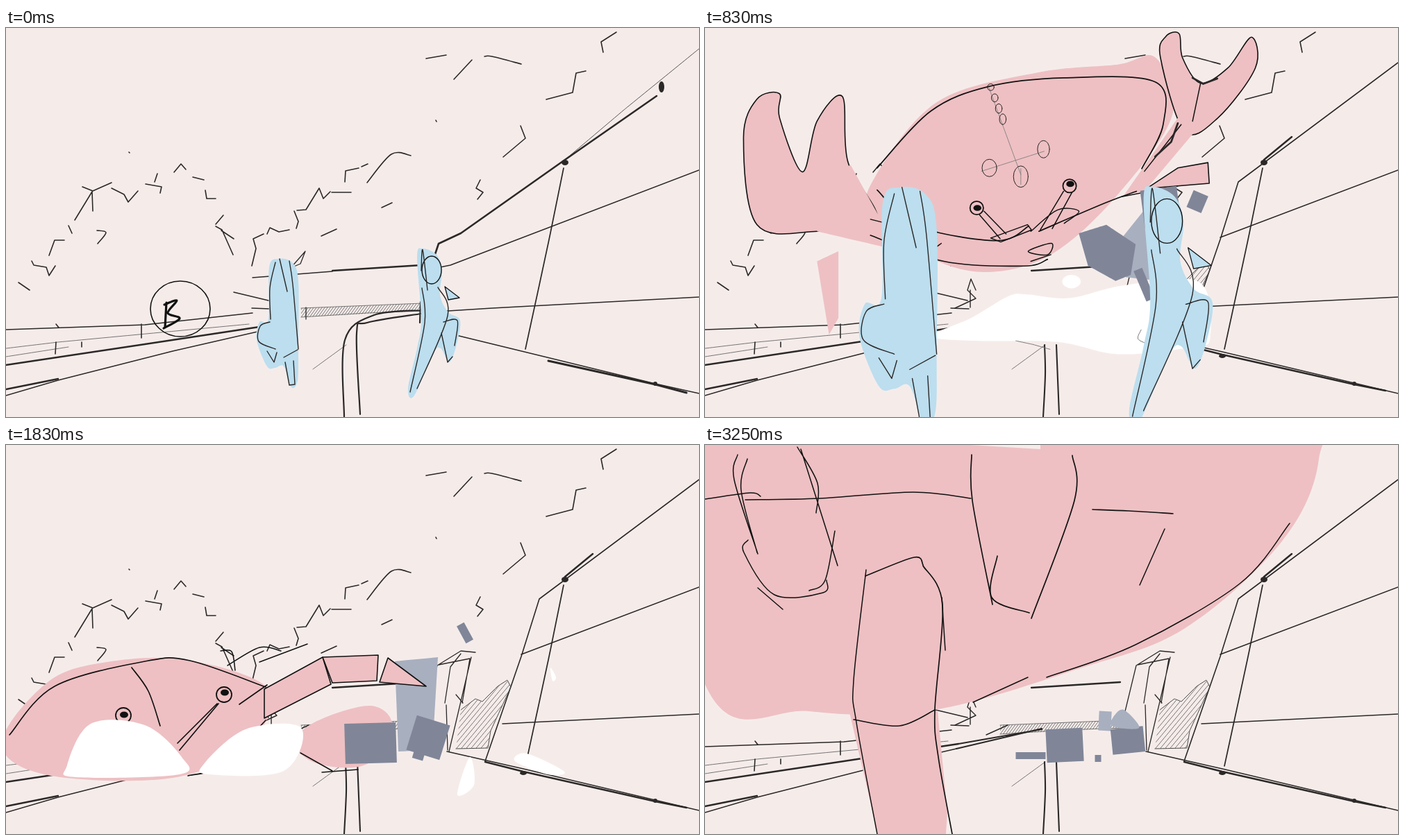
An HTML page with a canvas for the animation above (3370 ms loop, 998 by 561 pixels).

```html
<!DOCTYPE html>
<html lang="en">
<head>
<meta charset="utf-8">
<title>Giant crab storyboard</title>
<style>
html, body { margin: 0; height: 100%; overflow: hidden; background: #f5ecea }
canvas { display: block }
</style>
</head>
<body>
<canvas id="stage" width="998" height="561"></canvas>
<script>
const c = document.getElementById('stage').getContext('2d');
const PAPER = '#f5ecea', PINK = '#eec0c3', BLUE = '#bcdeee', SLATE = '#808698';
const MIST = '#a8afbf', WHITE = '#fff', COAL = '#2b2828', BLACK = '#111';
let T = -1, zoom = 1;
c.lineCap = c.lineJoin = 'round';

// Strokes split by ";". Prefix "~": smooth, "o": smooth and closed, "z": straight and closed.
function trace(text) {
  c.beginPath();
  for (const part of text.split(';')) {
    const n = part.match(/[\d.-]+/g).map(Number), len = n.length / 2;
    const closed = 'oz'.includes(part[0]), k = '~o'.includes(part[0]) ? 1 / 6 : 0;
    const at = i => {
      const j = closed ? (i + len) % len : Math.max(0, Math.min(len - 1, i));
      return [n[2 * j], n[2 * j + 1]];
    };
    c.moveTo(...at(0));
    for (let i = 0; i < len - !closed; i++) {
      const [a, p, q, d] = [at(i - 1), at(i), at(i + 1), at(i + 2)];
      c.bezierCurveTo(p[0] + (q[0] - a[0]) * k, p[1] + (q[1] - a[1]) * k,
        q[0] - (d[0] - p[0]) * k, q[1] - (d[1] - p[1]) * k, ...q);
    }
  }
}
function pen(w, color) {
  c.lineWidth = w / zoom;
  c.strokeStyle = color;
  c.stroke();
}
function ink(text, w = 1.5, color = BLACK) {
  trace(text);
  pen(w, color);
}
function fill(color, text) {
  trace(text);
  c.fillStyle = color;
  c.fill();
}
function shape(color, text, w = 1.6) {
  fill(color, text);
  pen(w, BLACK);
}
function oval(x, y, rx, ry, w, color) {
  c.beginPath();
  c.ellipse(x, y, rx, ry, 0, 0, 7);
  if (color) { c.fillStyle = color; c.fill(); }
  if (w) pen(w, BLACK);
}
function eye(x, y, r, lift = 0) {
  oval(x, y, r, r, 1.8, PINK);
  oval(x + 1, y - lift, 6, 4.5, 0, BLACK);
}
function block(color, x, y, w, h, turn = 0) {
  c.save();
  c.translate(x, y);
  c.rotate(turn);
  c.fillStyle = color;
  c.fillRect(-w / 2, -h / 2, w, h);
  c.restore();
}
function hatch(text, x0, x1, y0, y1, gap, lean) {
  c.save();
  trace(text);
  c.clip();
  for (let x = x0; x < x1; x += gap) ink(`${x} ${y1} ${x + lean} ${y0}`, 0.9, '#666');
  c.restore();
}

function trees() {
  const leaf = text => ink(text, 1.6, COAL);
  leaf('605 44 634 39;645 74 671 46;~689 41 700 41 742 52;778 103 816 93 821 65 835 62;879 6 857 20 860 35;716 186 748 159 741 141;683 219 677 231 687 237 679 247');
  leaf('541 259 556 252;454 300 476 290;~520 223 555 182 583 184;488 222 489 206 508 202;469 237 497 237;419 263 432 262 451 231 457 246 467 236;415 264 421 279 418 289');
  leaf('376 297 380 288 393 294 408 291;354 343 360 318 356 304 371 297;302 283 313 270;302 286 311 291 327 327;310 292 328 304;287 234 289 246 302 246;269 215 285 219');
  leaf('242 208 252 196 259 204;201 225 224 229 222 238;214 222 218 210;152 231 170 240 176 251 190 235;110 229 125 235 152 223;99 277 124 236 125 264;90 285 95 296');
  leaf('37 336 40 342 58 345 62 357 71 343;~131 292 144 295 132 311;18 367 34 378;62 328 70 306 84 306;512 200 521 196;177 179 178 180;619 133 620 135');
}

function road(broken) {
  ink('0 462 75 453 350 427;0 474 90 460;490 457 442 492', 0.9, '#666');
  ink('0 435 200 428 355 411;0 530 75 508 240 466 362 438;72 427 76 432;72 453 71 470;109 453 109 460;195 427 195 447;328 381 378 393;354 404 380 405', 1.6, COAL);
  ink('0 486 200 456 365 431;0 521 75 506;470 350 598 342', 2.3, COAL);
  ink('425 404 600 397;425 417 520 411 600 408', 0.9, '#666');
  hatch('425 404 600 397 600 408 425 417', 415, 605, 395, 420, 4, 18);
  if (broken) {
    ink('365 431 485 410;362 438 485 409;~489 457 490 500 487 561;506 457 510 557', 2.1, COAL);
    ink('383 362 378 378 390 390 360 404;383 362 390 378;382 378 382 403;405 418 436 404', 1.4, COAL);
  } else {
    ink('~487 561 488 450 530 414 598 407;~510 557 505 440 520 425 598 412;597 395 596 425', 2.2, COAL);
    ink('z410 346 431 322 424 340;355 360 470 351;432 403 432 420', 1.3, COAL);
  }
}

function wall(broken) {
  oval(805, 194, 5, 4, 0, COAL);
  oval(935, 513, 3, 3, 0, COAL);
  ink('~803 202 781 310 748 463', 1.7, COAL);
  if (!broken) {
    oval(944, 85, 4, 8, 0, COAL);
    ink('998 30 890 118 805 190', 1, '#555');
    ink('937 98 805 190 655 296 623 311 618 326', 2.6, COAL);
    ink('625 345 640 342 998 205;605 410 700 404 998 388;640 441 935 513 998 527', 1.6, COAL);
    ink('781 480 935 514 980 526', 3, COAL);
    return;
  }
  ink('998 50 768 222 742 305 690 456;742 302 998 205;715 402 998 388;635 442 745 467 998 527', 1.6, COAL);
  ink('845 157 805 190;690 457 745 471 935 514 980 523', 2.5, COAL);
  ink('605 384 621 318 655 297 676 299;623 317 668 308 657 372;670 306 638 442;632 372 640 320 655 301;634 375 636 440;648 360 658 372', 1.3, COAL);
  const hole = '655 382 676 366 686 370 708 348 722 339 727 349 698 412 694 437 648 438';
  ink(hole, 1, '#444');
  hatch(hole, 610, 730, 340, 442, 7, 85);
  oval(745, 473, 5, 3, 0, COAL);
}

function labelB() {
  oval(251, 405, 43, 40, 1.6);
  ink('231 396 229 432;~228 399 246 393 233 411 250 419 227 433', 3.2);
}
function labelB3() {
  oval(247, 399, 48, 46, 2.6);
  ink('~230 354 200 400 230 442;288 376 292 372', 2.2);
  ink('219 388 222 420;~217 389 238 385 223 403 244 409 220 422;~252 380 272 380 257 392 275 400 258 411', 3);
}

function runnerLeft() {
  fill(BLUE, 'o379 345 392 333 412 338 421 365 421 460 420 508 411 518 400 488 388 490 376 488 361 450 365 424 378 419');
  ink('~388 338 380 375 381 420;~394 333 405 380;~408 336 413 370 421 463;~380 424 366 430 364 452 388 463;376 466 386 482 390 468;420 464 400 475;402 482 408 515 416 514 414 480', 1.4, COAL);
}
function runnerRight() {
  fill(BLUE, 'o600 318 620 327 628 350 625 385 637 410 654 422 648 460 638 482 626 462 615 470 588 530 579 520 592 462 598 420 592 330');
  shape(BLUE, 'z632 373 653 389 637 392', 1.3);
  oval(613, 349, 14, 20, 1.4);
  ink('~598 350 600 320 607 378;~599 375 603 425 582 525;~622 374 636 415 592 520;~630 424 650 422 646 458;627 440 636 482 643 474', 1.4, COAL);
}
function closeLeft() {
  block(BLUE, 210, 290, 30, 40);
  shape(BLUE, 'z266 332 313 405 276 460 252 458 285 410');
  shape(BLUE, 'z152 440 163 426 176 445 165 460');
  fill(BLUE, 'z183 463 270 463 264 538 318 538 312 561 186 561');
  fill(BLUE, 'o158 325 194 302 226 303 268 328 270 380 264 466 184 466');
  oval(210, 235, 31, 46, 0, BLUE);
  oval(210, 238, 30, 44, 1.8);
  oval(271, 343, 13, 18, 1.6);
  ink('~198 196 203 240 199 300;~196 275 196 303 158 325 166 355;~223 285 226 303 276 329;168 345 182 462;264 375 260 440;~194 310 204 398;188 465 240 467', 1.8);
  ink('186 463 191 561;~270 468 275 495 264 538;262 545 315 535 312 561;217 488 198 561;z252 446 274 441 275 462 257 466;~193 153 230 158 258 198', 1.5);
}
function closeRight() {
  fill(BLUE, 'z748 296 762 318 745 378 734 372');
  fill(BLUE, 'o750 296 785 284 838 300 838 350 824 400 820 480 826 561 802 561 805 505 746 526 740 490 768 484 760 350');
  shape(BLUE, 'z722 405 738 398 741 420 728 432');
  shape(BLUE, 'z841 390 866 398 855 416 842 416');
  oval(791, 235, 33, 42, 0, BLUE);
  oval(796, 236, 27, 39, 1.6);
  oval(808, 499, 11, 16, 1.6);
  ink('~742 262 746 218 784 180;~895 308 925 300 937 280;~762 240 768 208 815 210', 0.8, '#777');
  ink('789 300 803 322 816 293;748 294 785 291;818 290 837 308;756 297 720 410;~835 300 829 390 821 548;758 350 774 435;~765 415 812 460 790 528;~740 487 742 526 755 522', 1.6);
}

function burst() {
  fill(PINK, 'o370 98 450 58 560 45 650 62 694 130 680 210 600 305 540 328 400 315 310 275');
  fill(PINK, 'o302 74 360 105 350 170 327 250 330 290 262 265 209 220 225 160');
  ink('375 102 441 79;~448 78 470 72 502 70;~510 69 585 64 650 72;590 255 640 232;604 292 640 264;~673 210 720 180 745 158', 1.4);
  ink('~211 236 196 215 240 118 300 84 336 96;~340 104 366 117 327 205 318 250;~275 184 319 113;~203 226 260 242 352 268 348 288;~261 262 390 292 415 298;~352 267 400 282 465 290');
  ink('~461 258 482 290;~469 258 492 281;565 235 556 262;574 234 566 268;z467 288 480 272 516 274 500 289;z537 274 556 253 588 258 560 272');
  for (let y = 298; y < 325; y += 7) ink(`${520} ${y} ${546} ${y - 5}`, 1.2);
  eye(458, 248, 11, 5);
  eye(573, 222, 11, 5);
  fill(MIST, '640 248 640 284 678 283 674 363 630 350 607 292');
  fill(WHITE, 'o388 446 460 402 515 401 545 376 600 390 708 378 681 457 600 460 400 458');
  block(SLATE, 678, 246, 68, 70, -0.1);
  fill(SLATE, '545 280 605 288 622 368 555 358');
  fill(SLATE, '712 240 737 205 756 256 720 268');
  fill(SLATE, '660 356 677 406 650 407');
  ink('760 232 808 335;745 275 810 327;748 295 785 265;792 335 822 330 815 382 797 337');
}

function flyingCrab() {
  fill(PINK, 'o236 220 330 106 480 62 600 50 657 40 682 125 600 245 500 335 400 361 310 335 232 275');
  fill(PINK, '150 345 182 330 182 430 168 455');
  shape(PINK, 'z643 236 690 205 735 197 737 228 690 232');
  shape(PINK, 'o40 160 60 102 94 94 94 130 128 211 150 135 188 98 196 195 240 285 150 300 60 290');
  shape(PINK, 'o664 40 672 8 692 4 697 40 724 78 765 55 800 9 806 55 750 130 700 150');
  fill(PINK, '150 240 200 200 250 290 330 318 300 335 150 300');
  fill(PINK, '690 130 720 145 640 240 610 245');
  ink('~240 205 320 120 407 83 520 70 656 76 668 140 636 206;~240 238 300 292 420 314 467 292;~482 300 580 258 628 240;~230 306 340 345 460 352 495 342', 1.7);
  ink('695 140 640 210;724 78 712 135;230 282 310 302;~250 350 318 328 336 318;606 248 690 232');
  ink('656 188 680 166 690 138;712 70 728 79 749 71', 2.8, COAL);
  ink('407 84 455 215;396 210 490 180;455 206 455 230', 0.8, '#777');
  for (let i = 0; i < 4; i++) oval(410 + i * 6, 84 + i * 16, 5, 5 + i, 0.9);
  oval(408, 205, 11, 13, 0.9);
  oval(455, 218, 11, 16, 0.9);
  oval(489, 177, 9, 13, 0.9);
  ink('393 275 424 311;400 270 433 304;519 240 484 298;532 241 502 296;z410 310 465 290 471 298 425 316;~470 300 510 268 542 270 520 288;o466 330 501 318 495 335;470 345 500 335');
  eye(389, 265, 10);
  eye(528, 232, 10, 3);
}
function dust() {
  fill(WHITE, 'o275 460 340 430 400 395 430 392 500 398 590 377 712 372 730 462 700 478 580 490 480 470 340 468');
  oval(503, 371, 15, 11, 0, WHITE);
  fill(MIST, '625 250 657 280 652 370 592 364 585 300');
  block(SLATE, 649, 249, 60, 62, -0.13);
  fill(SLATE, '515 292 560 278 608 310 600 360 575 370 530 345');
  block(SLATE, 709, 240, 26, 30, 0.4);
  block(SLATE, 622, 376, 15, 54, -0.4);
  ink('~617 450 612 465 630 474;412 468 440 474;440 474 468 482', 1, '#777');
}

function crash() {
  fill(MIST, '560 312 622 306 614 440 565 442');
  fill(PINK, 'o-6 430 60 342 145 313 260 310 378 352 350 430 240 480 60 476');
  fill(PINK, 'o415 430 448 398 525 376 556 405 520 460 450 460');
  shape(PINK, 'z372 394 372 352 456 306 468 345');
  shape(PINK, 'z456 306 536 303 534 340 470 343');
  shape(PINK, 'z538 342 550 307 605 348');
  ink('~5 418 70 348 200 312 265 311 374 349;~181 321 205 355 222 405;~304 373 247 430;~306 373 250 440;~374 397 310 462 262 477;336 374 376 346', 1.7);
  ink('365 313 434 287;~309 297 325 298 330 325;~319 318 365 292 396 297;455 472 507 468;~424 444 470 470');
  eye(169, 390, 11, 1);
  eye(314, 360, 11, 3);
  block(SLATE, 525, 430, 74, 58, -0.03);
  block(SLATE, 608, 422, 50, 52, 0.3);
  block(SLATE, 661, 271, 12, 28, -0.5);
  block(SLATE, 594, 448, 16, 11, 0.3);
  fill(WHITE, 'o88 462 122 402 200 404 253 450 250 475 100 479');
  fill(WHITE, 'o285 460 345 410 425 408 400 470 293 475');
  fill(WHITE, 'o733 456 750 445 804 471 780 475');
  fill(WHITE, 'o650 504 668 450 674 490');
  fill(WHITE, 'o784 321 792 335 787 340');
}

function standing() {
  fill(PINK, 'o215 300 310 270 380 268 510 300 562 365 480 402 300 415 225 375');
  fill(PINK, 'o106 380 112 300 148 268 144 286 188 315 186 343 138 315');
  fill(PINK, 'o186 320 210 300 245 298 224 365 210 485 184 420');
  fill(PINK, 'o270 312 300 284 316 320 288 430 266 488 259 440');
  ink('~247 304 208 300 187 320 184 390 204 476;~188 318 205 328 240 304;230 328 214 488;~265 318 296 288 314 328 276 492;~272 305 316 302;270 320 265 475;~146 293 98 320 108 394', 1.4);
  ink('~347 287 450 291 540 345 556 369;~370 281 430 304 490 366;557 345 598 341;195 472 203 489;209 472 197 487', 2);
  oval(518, 341, 10, 12, 2);
  oval(582, 337, 12, 13, 2);
  ink('180 487 214 493;254 493 300 489', 1);
  shape(PINK, 'o397 390 412 367 470 392 522 450 515 468 475 470 440 448');
  shape(PINK, 'o583 375 592 354 655 366 660 390 630 393 588 386');
  oval(479, 403, 2.5, 2.5, 0, BLACK);
}
function rubble(early) {
  block(MIST, 576, 398, 18, 28, 0.05);
  block(SLATE, 609, 426, 47, 37, -0.1);
  block(SLATE, 566, 452, 9, 10);
  if (early) {
    block(MIST, 611, 314, 36, 33, 0.75);
    block(SLATE, 532, 427, 28, 44, -0.1);
  } else {
    fill(MIST, 'o586 405 592 387 605 383 625 408');
    block(SLATE, 518, 433, 53, 48, -0.05);
    block(SLATE, 469, 448, 43, 10);
  }
}

function leaping() {
  fill(PINK, 'o232 265 318 190 470 188 520 164 558 205 512 250 558 295 500 335 340 366 245 325');
  fill(PINK, 'o375 184 430 112 460 113 505 240 502 330 425 195 403 205 383 305 350 270');
  fill(PINK, 'o158 370 195 280 213 300 190 380 198 470 168 480');
  fill(PINK, 'o210 280 280 243 326 285 255 300 246 418');
  oval(564, 267, 13, 18, 0, PINK);
  ink('~235 262 265 232 321 202;~252 320 275 356 410 360 500 335;430 112 376 184 349 270;~430 112 415 150 420 187 402 204 383 306', 2);
  ink('~457 112 505 235 511 310 494 320;~427 192 465 240 499 326;~349 275 350 300 368 306;~190 280 161 355;~153 372 167 484;~210 276 246 418;248 290 246 418;232 264 284 244 326 286 325 303;253 301 284 293', 1.9);
  ink('~358 270 380 262 382 300;~440 228 428 260 470 262;~490 184 520 162 556 200;~515 255 545 240 560 215;~541 258 555 285 515 332;~555 250 577 255 563 282;433 102 438 95;310 268 365 264');
  ink('499 330 500 343;165 484 166 488', 3);
}

function looming() {
  fill(PINK, 'o-90 -150 400 -170 860 -100 884 20 830 140 690 265 540 322 330 382 150 384 0 345');
  fill(PINK, '208 385 335 383 349 530 346 575 252 575');
  fill(PAPER, '383 0 483 0 483 6');
  ink('~0 78 65 69 80 74;~58 79 165 77 300 68 383 77;~47 14 42 50 76 157;~61 20 52 65 75 155;~133 3 162 55 160 98;~138 6 191 174;~62 137 56 155 100 216 170 213 175 195;~187 124 173 195 150 210;76 206 112 237');
  ink('~384 14 385 80 414 230;~529 15 532 80 470 250;~421 160 413 220 467 242;~558 93 610 95 674 99;~231 189 301 162 314 173;~314 174 342 230 331 382 336 450 356 561', 1.7);
  ink('~232 180 214 340 218 400 248 561;~214 396 280 405 331 382;~842 113 770 200 620 288 492 335;~465 335 386 371;341 220 346 296;~662 121 626 202');
}

// Shows a drawing from t0 to t1, moving from one [dx, dy, scale] to another about (px, py).
const REST = [0, 0, 1];
function act(draw, t0, t1, from = REST, to = from, px = 400, py = 300) {
  if (T < t0 || T > t1) return;
  const u = t1 > t0 ? (T - t0) / (t1 - t0) : 0;
  const [dx, dy, s] = from.map((v, i) => v + (to[i] - v) * u);
  c.save();
  c.translate(px + dx, py + dy);
  c.scale(s, s);
  c.translate(-px, -py);
  zoom = s;
  draw();
  zoom = 1;
  c.restore();
}

function scene() {
  const broken = T >= 280;
  c.fillStyle = PAPER;
  c.fillRect(0, 0, 998, 561);
  trees();
  road(broken);
  wall(broken);
  act(labelB, 0, 0);

  act(burst, 280, 580, [30, 45, 0.25], REST, 620, 310);
  act(flyingCrab, 670, 1320, [0, -4, 0.95], REST, 450, 200);
  act(flyingCrab, 1390, 1460);
  act(flyingCrab, 1540, 1710, [-35, 45, 1], [-120, 150, 0.95], 450, 200);
  act(dust, 670, 1460, [15, -8, 0.85], REST, 610, 380);
  act(dust, 1540, 1710, [-10, 5, 1.04], [-30, 15, 1.1], 610, 380);
  act(labelB3, 580, 670);

  const near = [-42, -2, 1.25], far = [25, -4, 1.09];
  act(runnerLeft, 0, 580, REST, near, 392, 425);
  act(runnerRight, 0, 580, REST, far, 616, 425);
  act(runnerLeft, 670, 830, near, [-112, -25, 1.85], 392, 425);
  act(runnerRight, 670, 830, far, [54, -25, 1.6], 616, 425);
  act(closeLeft, 1250, 1460, [30, 20, 0.82], REST, 230, 400);
  act(closeRight, 1250, 1460, [-55, 20, 0.82], REST, 795, 400);
  act(closeLeft, 1540, 1630, [-70, 50, 1.3], [-200, 130, 1.9], 230, 400);
  act(closeRight, 1540, 1630, [80, 50, 1.3], [220, 130, 1.9], 795, 400);

  act(crash, 1830, 1990, REST, [25, -12, 0.97]);
  act(standing, 2060, 2330, [-35, 40, 1.04], REST);
  act(standing, 2420, 2420, [0, 8, 0.98]);
  act(() => rubble(true), 2060, 2420);
  act(() => rubble(false), 2500, 3250);
  act(leaping, 2500, 2750, [-12, 45, 0.86], REST);
  act(leaping, 2880, 3000, [-10, -15, 1.25], [-20, -45, 1.7]);
  act(looming, 3130, 3250, [-30, -20, 0.85], REST);
}

// Runs of evenly spaced drawings: first time, last time, count.
const STEPS = [0, 670, 830];
for (const [a, b, n] of [[130, 580, 7], [1250, 1460, 4], [1540, 1710, 3], [1830, 1830, 1], [1920, 2330, 7], [2420, 2580, 3], [2750, 2750, 1], [2880, 3250, 4]])
  for (let i = 0; i < n; i++) STEPS.push(a + Math.round((b - a) * i / Math.max(1, n - 1) / 10) * 10);
STEPS.sort((a, b) => a - b);

function frame() {
  const ms = performance.now() % 3370;
  const now = STEPS.findLast(s => s <= ms);
  if (now !== T) { T = now; scene(); }
  requestAnimationFrame(frame);
}
frame();
</script>
</body>
</html>
```
